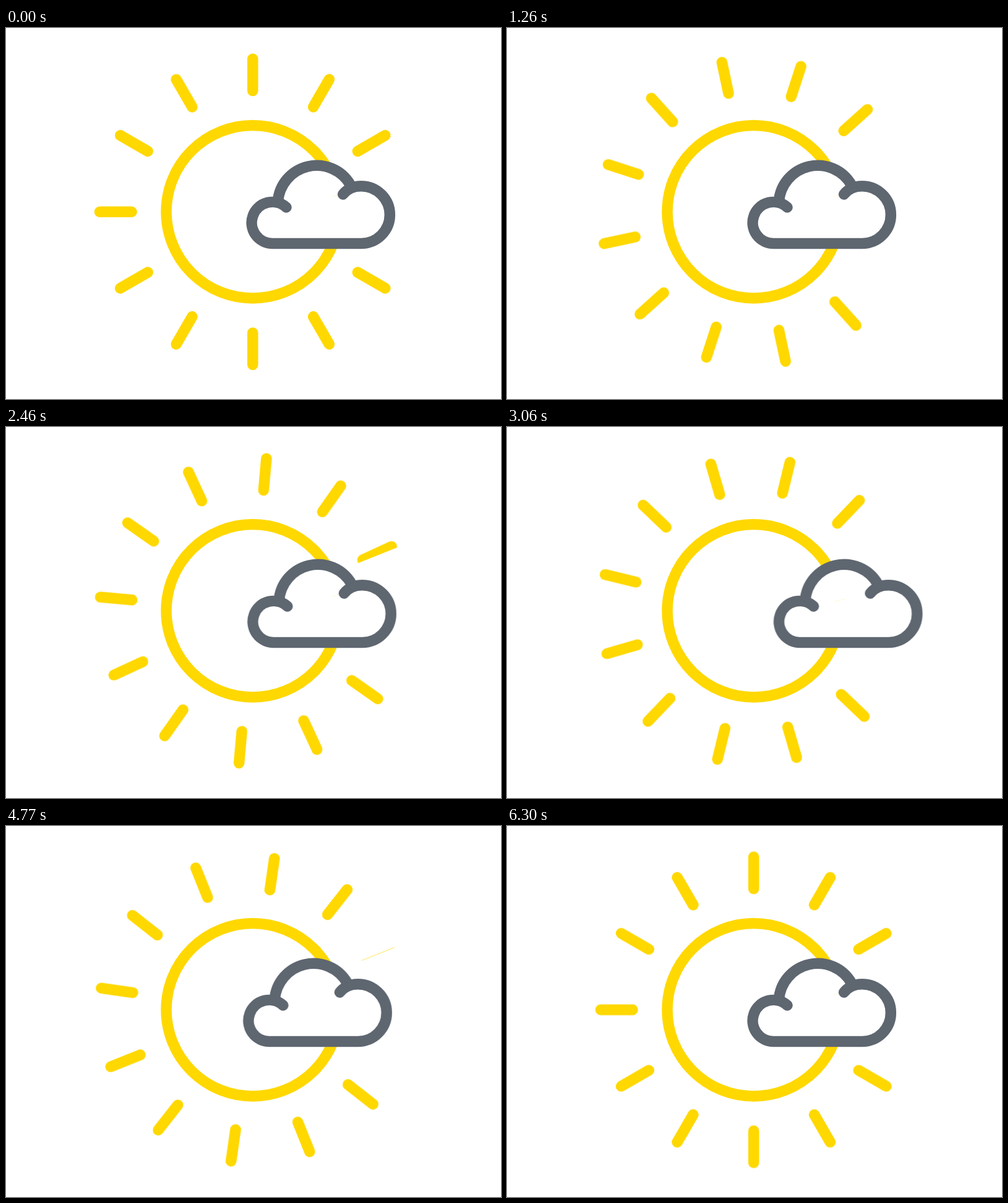
These frames come from a looping animation (800 px wide and 600 px high, 6.33 s). An HTML page:

```html
<!DOCTYPE html>
<html lang="en">
<head>
<meta charset="utf-8">
<title>Sun and cloud</title>
<style>
  html, body { margin: 0; width: 100%; height: 100%; overflow: hidden; background: #fff; }
  svg { display: block; width: 800px; height: 600px; }
  .sun { fill: none; stroke: #ffd800; stroke-width: 17.5; stroke-linecap: round; }
  .cloud { fill: none; stroke: #5e6670; stroke-width: 17.5; }
  .blank { fill: #fff; stroke: none; }

  /* A quarter turn in 30 ms ticks, both end poses included */
  #rays {
    transform-origin: 398.75px 297.25px;
    animation: turn 6330ms steps(211, jump-none) infinite;
  }
  @keyframes turn {
    from { transform: rotate(0deg); }
    to { transform: rotate(90deg); }
  }

  .cloud { animation: drift 6330ms cubic-bezier(.69, 0, .31, 1) infinite; }
  @keyframes drift {
    0%, 35.07% { transform: translateX(0); }
    54.03% { transform: translateX(47.2px); }
    69.19% { transform: translateX(-6px); }
    88.15%, 100% { transform: translateX(0); }
  }
</style>
</head>
<body>
<svg viewBox="0 0 800 600">
  <g class="sun">
    <circle cx="398.75" cy="297.25" r="139.75"/>
    <g id="rays"></g>
  </g>
  <!-- Hides the rays that pass behind the cloud -->
  <path class="blank" d="M560 223.7 L680 175.7 V411.2 L560 362.5 Z"/>
  <g class="cloud">
    <path class="blank" d="M439.4 281 A62.9 62.9 0 0 1 556.5 253.5 L544.6 269 L453 290 Z"/>
    <path fill="#fff" stroke-linecap="round" stroke-linejoin="round"
      d="M453 290 A33.5 33.5 0 1 0 431.2 348.4 H574 A46.35 46.35 0 0 0 574 255.7 C562 255.7 551 260.5 544.6 269"/>
    <path d="M439.4 281 A62.9 62.9 0 0 1 556.5 253.5"/>
  </g>
</svg>
<script>
  const rays = document.getElementById('rays');
  for (let i = 0; i < 12; i++) {
    const ray = document.createElementNS(rays.namespaceURI, 'path');
    ray.setAttribute('d', 'M398.75 50 V101.5');
    ray.setAttribute('transform', `rotate(${i * 30} 398.75 297.25)`);
    rays.append(ray);
  }
</script>
</body>
</html>
```
